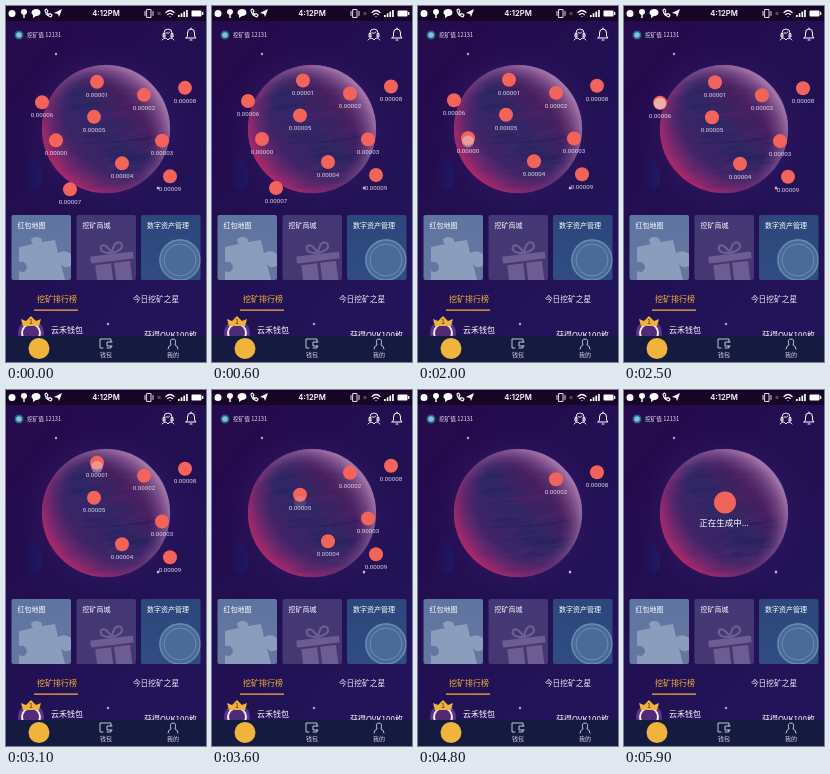
These frames come from a looping animation (200x356 px, 6000 ms). An HTML page with a canvas:

```html
<!DOCTYPE html>
<html lang="zh-CN">
<head>
<meta charset="utf-8">
<style>
html, body { margin: 0; width: 100%; height: 100%; overflow: hidden; background: #200d4f; }
canvas { display: block; width: 200px; height: 356px; }
</style>
</head>
<body>
<canvas id="stage"></canvas>
<script>
const W = 200, H = 356, LOOP = 6000;
const BOB_PERIOD = 2300, BOB_PHASE = -.52, BOB_HEIGHT = 3.3, TAP_LENGTH = 250;
const FONT = '"Noto Sans CJK SC", "Noto Sans", sans-serif';
const GOLD = '#f0b43c', CORAL = '#f2645a';
const scale = Math.max(1, window.devicePixelRatio || 1);

const stage = document.getElementById('stage');
const view = stage.getContext('2d');
const backdrop = document.createElement('canvas');
for (const c of [stage, backdrop]) { c.width = W * scale; c.height = H * scale; }
view.scale(scale, scale);
let g = backdrop.getContext('2d');
g.scale(scale, scale);

function addStops(fill, colors) {
  colors.forEach((c, i) => fill.addColorStop(i / (colors.length - 1), c));
  return fill;
}
function gradient(x0, y0, x1, y1, ...colors) {
  return addStops(g.createLinearGradient(x0, y0, x1, y1), colors);
}
function radial(x, y, r0, r1, ...colors) {
  return addStops(g.createRadialGradient(x, y, r0, x, y, r1), colors);
}
function rect(x, y, w, h, color, r = 0) {
  g.fillStyle = color;
  g.beginPath();
  g.roundRect(x, y, w, h, r);
  g.fill();
}
function disc(x, y, r, color) {
  g.fillStyle = color;
  g.beginPath();
  g.arc(x, y, r, 0, 7);
  g.fill();
}
function ring(x, y, r, color, width = 1) {
  g.strokeStyle = color;
  g.lineWidth = width;
  g.beginPath();
  g.arc(x, y, r, 0, 7);
  g.stroke();
}
function label(text, x, y, size, color = '#fff', align = 'left', font = FONT, weight = 400) {
  g.font = `${weight} ${size}px ${font}`;
  g.textAlign = align;
  g.textBaseline = 'middle';
  g.fillStyle = color;
  g.fillText(text, x, y);
}
function line(path, x, y, color = '#fff', width = 1) {
  g.save();
  g.translate(x, y);
  g.strokeStyle = color;
  g.lineWidth = width;
  g.lineCap = g.lineJoin = 'round';
  g.stroke(new Path2D(path));
  g.restore();
}
function shape(path, x, y, color = '#fff') {
  g.save();
  g.translate(x, y);
  g.fillStyle = color;
  g.fill(new Path2D(path));
  g.restore();
}
function star(x, y, size = 2) {
  shape(`M0 ${-size}Q0 0 ${size * .7} 0Q0 0 0 ${size}Q0 0 ${-size * .7} 0Q0 0 0 ${-size}`, x, y, '#dcd4ff');
  disc(x, y, .65, '#eeeaff');
}

function drawSky() {
  rect(0, 0, W, H, gradient(0, 80, 200, 240, '#250a4c', '#211052', '#231459'));
  rect(0, 15, W, 230, radial(100, 123, 60, 90, 'rgba(62,28,110,.35)', 'rgba(45,17,95,0)'));
  shape('M25 146Q38 162 36 175Q33 186 25 184Q14 178 17 163Q20 154 25 146', 0, 0,
    gradient(17, 0, 37, 0, 'rgba(32,17,88,.3)', 'rgba(29,29,104,.85)'));
  star(50, 48);
  star(152, 182, 2.5);
  star(102, 318);
}

function drawPlanet() {
  let seed = 17;
  const random = () => (seed = seed * 16807 % 2147483647) / 2147483647;
  g.save();
  g.beginPath();
  g.arc(100, 123, 64, 0, 7);
  g.clip();
  rect(36, 58, 128, 130, gradient(48, 163, 145, 78, '#6d2468', '#3f2467', '#2f2766', '#45205f', '#65386f'));
  for (let i = 0; i < 90; i++) {
    const y = 60 + random() * 126, x = 38 + random() * 124;
    const upper = y < 125 && x > 75;
    const color = i % 2 ? '31,29,91' : upper ? '112,34,111' : '92,43,112';
    g.fillStyle = `rgba(${color},${.1 + random() * .2})`;
    g.beginPath();
    g.ellipse(x, y, 5 + random() * 26, .7 + random() * 2.5, -.12, 0, 7);
    g.fill();
  }
  const limb = (x, y, color) =>
    rect(36, 58, 128, 130, radial(x, y, 54, 78, 'rgba(100,50,120,0)', color));
  limb(113, 113, 'rgba(180,40,108,.8)');
  limb(88, 134, 'rgba(172,126,177,.85)');
  g.restore();
  ring(100, 123, 63.7, gradient(45, 160, 150, 80, '#a92d70', '#53307a', '#9a76a5'), .6);
}

function drawStatus() {
  rect(0, 0, W, 15, '#170528');
  disc(6, 7.5, 3.5, '#fff');
  shape('M0-4Q3-4 3-1Q3 1 .7 2V5H-.7V2Q-3 1-3-1Q-3-4 0-4', 18, 7);
  shape('M0-4C6-4 6 3 0 3L-3 5L-3 2C-6 0-4-4 0-4', 30, 7);
  line('M-3-3Q-3 2 3 4L4 2L2 .5L.5 1.5Q-1 0-1-1L0-2L-1.5-4Z', 42, 7, '#fff', 1.1);
  shape('M-4 0L4-4L1 4L0 1Z', 52, 7);
  label('4:12PM', 100, 8, 7.7, '#fff', 'center', 'Inter, sans-serif', 600);
  line('M-2-4H2V4H-2ZM-4-2V2M4-2V2', 143, 7.5, '#ddd');
  rect(151.5, 6, 3, 3, '#51445d');
  line('M-4-1Q0-5 4-1M-2.3 1Q0-1 2.3 1M0 3V3.1', 164, 7.5, '#fff', 1.2);
  for (let i = 0; i < 4; i++) rect(172 + i * 2.7, 9 - i * 1.7, 1.7, 2 + i * 1.7, '#fff');
  rect(185.5, 4.5, 10, 6, '#fff', 1);
  rect(196, 6, 1.3, 3, '#fff');
}

function drawHeader() {
  disc(13, 29, 4.5, '#286188');
  disc(13, 29, 2.8, '#78c7d4');
  label('挖矿值 12131', 21, 29, 5.7, '#e9e6f5');
  line('M-4 3V-1A4 4 0 0 1 4-1V3M-5 0V3H-3V0ZM5 0V3H3V0ZM-2-1Q1 0 2-2M-6 6Q-5 4-2 4L0 6L2 4Q5 4 6 6', 162, 28, '#fff', .9);
  line('M-5 4H5L3.5 2V-1Q3.5-5 0-5Q-3.5-5-3.5-1V2ZM-1 6H1M0-6V-5', 185, 28);
}

function drawCards() {
  const cards = [
    [5.5, '红包地图', '#5e75a1', '#65779f'],
    [70.5, '挖矿商城', '#433876', '#463772'],
    [135, '数字资产管理', '#2b477c', '#304d83']
  ];
  for (const [x, title, top, bottom] of cards) {
    rect(x, 209, 59.5, 65, gradient(0, 209, 0, 274, top, bottom), 2);
    label(title, x + 6, 219.5, 7);
  }
  g.save();
  g.beginPath();
  for (const [x] of cards) g.rect(x, 209, 59.5, 65);
  g.clip();
  shape('M13 241L27 238Q22 233 29 231Q37 231 36 236L49 234L52 247Q59 243 65 248V260Q58 263 55 258L59 274H13V265Q20 268 21 261Q20 255 13 256Z', 0, 0, '#8c9cbc');
  g.translate(107, 256);
  g.rotate(-.12);
  const lilac = '#6d5c92';
  rect(-22, -8, 43, 7, lilac, 1);
  rect(-18, 1, 16, 22, lilac);
  rect(1, 1, 16, 22, lilac);
  line('M0-9Q-13-10-10-17Q-5-20 0-9Q4-22 10-18Q14-11 0-9', 0, 0, lilac, 2.2);
  g.rotate(.12);
  g.translate(-107, -256);
  disc(174, 254, 21, '#486b9a');
  ring(174, 254, 20, '#6c8db1', 1.3);
  ring(174, 254, 16, '#6c8db1', 1);
  g.restore();
}

function drawRanking() {
  label('挖矿排行榜', 51, 293, 8, GOLD, 'center');
  label('今日挖矿之星', 150, 293, 7.7, '#eeeaf5', 'center');
  rect(28, 303.5, 44, 1.3, GOLD);
  disc(25, 327, 13, '#5a3487');
  disc(25, 327, 10, '#f2eef7');
  disc(25, 327, 8, '#512b79');
  shape('M15 313L20 315L25 310L30 315L35 313L33 320H17Z', 0, 0, GOLD);
  label('1', 25, 316, 6, '#704218', 'center', FONT, 700);
  label('云禾钱包', 45, 323.5, 8);
  label('获得QVK100枚', 138, 329, 8);
}

function drawNavigation() {
  rect(0, 330, W, 26, '#141a40');
  disc(33, 342.5, 10.5, GOLD);
  line('M5-2V-5H-6V4H-3M5 2V4H1M6-2H1V2H6', 100, 338, '#d9d7e6', .9);
  label('钱包', 100, 349, 6, '#d9d7e6', 'center');
  line('M-5 5Q-5 2-2 1Q-4-5 0-5Q4-5 2 1Q5 2 5 5', 167, 338, '#d9d7e6', .9);
  label('我的', 167, 349, 6, '#d9d7e6', 'center');
}

// Each coin: value digit, x, resting y, time of the tap.
const coins = [
  [7, 64, 180.5, 1450], [0, 50, 131.5, 1900], [6, 36, 93.5, 2450],
  [1, 91, 73, 2980], [5, 88, 108, 3400], [4, 116, 154.5, 3780],
  [9, 164, 167.5, 4120], [3, 156, 131.8, 4450], [2, 138, 86, 4850],
  [8, 179, 79, 5000]
];

function drawCoin([digit, x, y, tap], time) {
  const age = time - tap;
  if (age > TAP_LENGTH) return;
  const cy = y + BOB_HEIGHT * Math.cos(time / BOB_PERIOD * Math.PI * 2 + BOB_PHASE);
  disc(x, cy, 7, CORAL);
  label('0.0000' + digit, x, cy + 13, 6.2, '#ddd6e7', 'center', 'Roboto, sans-serif');
  if (age >= 0) disc(x, y + 4, 6, `rgba(232,220,222,${.8 * (1 - age / TAP_LENGTH)})`);
}

drawSky();
drawPlanet();
drawStatus();
drawHeader();
drawCards();
drawRanking();
drawNavigation();
g = view;

function render() {
  const time = performance.now() % LOOP;
  g.drawImage(backdrop, 0, 0, W, H);
  coins.forEach(coin => drawCoin(coin, time));
  if (time >= 5400) {
    disc(101, 112.5, 11, CORAL);
    label('正在生成中...', 100, 132.5, 8.5, '#fff', 'center');
  }
  requestAnimationFrame(render);
}
render();
</script>
</body>
</html>
```
